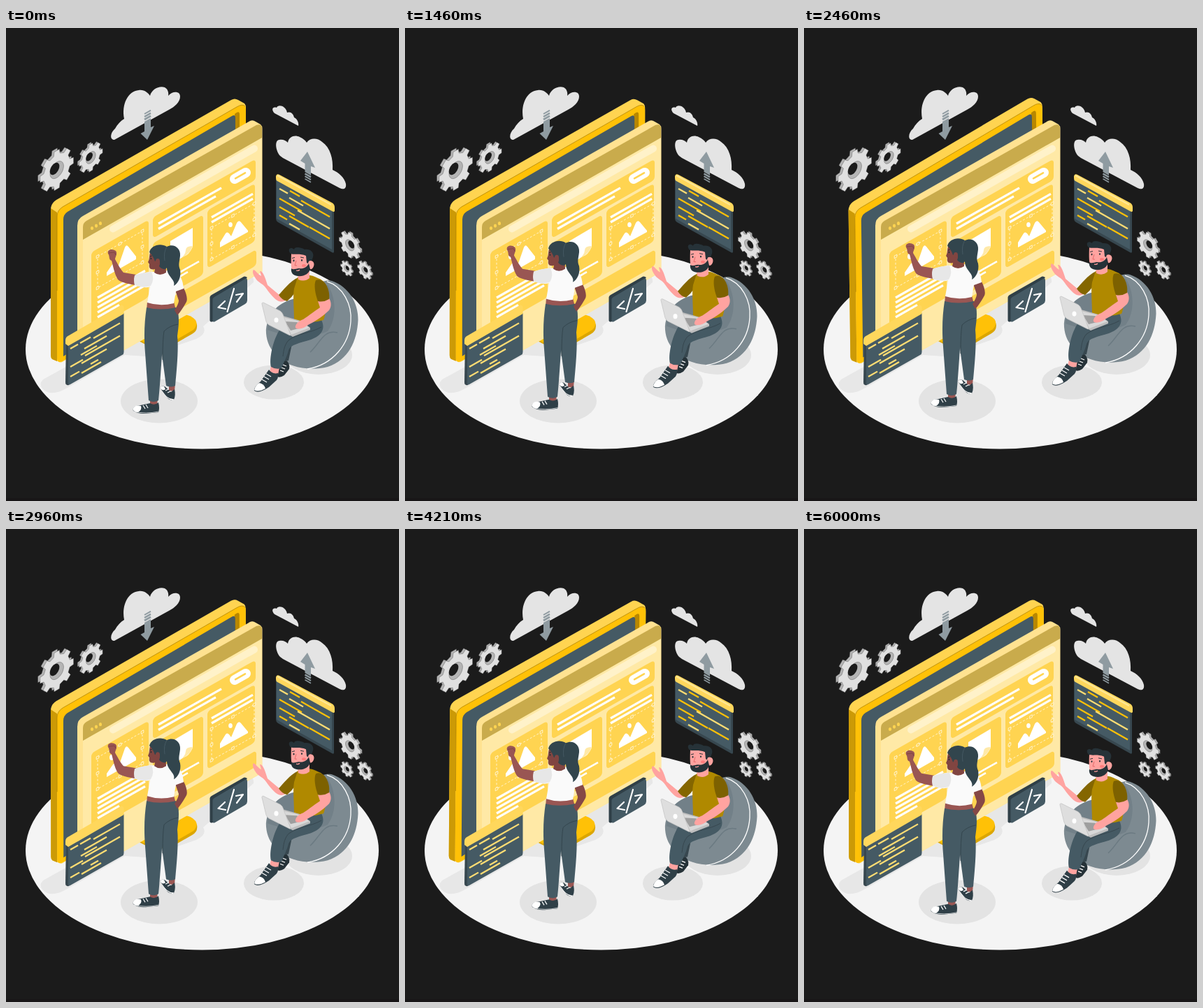
These frames come from a looping animation (562x677 px, 6040 ms). An HTML page:

```html
<!DOCTYPE html>
<html lang="en">
<head>
<meta charset="utf-8">
<title>Isometric web design scene</title>
<style>
html, body { margin: 0; width: 100%; height: 100%; overflow: hidden; background: #1b1b1b; }
svg { display: block; width: 100vw; height: 100vh; }
</style>
</head>
<body>
<svg id="stage" viewBox="0 0 562 677" preserveAspectRatio="none"></svg>
<script>
const LOOP = 6040, RISE = 11, SWAY = 1;
const BG = '#1b1b1b', SLATE = '#455a64', INK = '#263238', HAIR = '#32454d', GOLD = '#ffc107',
  YELLOW = '#ffd451', CREAM = '#ffe9a6', WHITE = '#fff', GREY = '#e0e0e0',
  BROWN = '#995653', PINK = '#ffa3a0';

const shape = (fill, d, extra = '') => `<path fill="${fill}" d="${d}" ${extra}/>`;
const stroke = (color, width, d, extra = '') =>
  `<path fill="none" stroke="${color}" stroke-width="${width}" d="${d}" ${extra}/>`;
const oval = (fill, cx, cy, rx, ry = rx) =>
  `<ellipse fill="${fill}" cx="${cx}" cy="${cy}" rx="${rx}" ry="${ry}"/>`;
const group = (id, body) => `<g id="${id}">${body}</g>`;
const ROUND = 'stroke-linecap="round" stroke-linejoin="round"';

// Line that follows the isometric slope: k < 0 climbs to the right.
const slant = (x, y, w, k = -0.569) => `M${x} ${y}l${w} ${w * k}`;

function gear(cx, cy, r, k, teeth = 8) {
  const point = (a, q) => {
    const x = Math.cos(a) * q, y = Math.sin(a) * q;
    return `${(x * 0.866).toFixed(2)} ${(y + x * k).toFixed(2)}`;
  };
  const ring = [];
  for (let i = 0; i < teeth; i++) {
    for (const [at, q] of [[-0.3, 0.79], [-0.2, 1], [0.2, 1], [0.3, 0.79]]) {
      ring.push(point((i + at) * 2 * Math.PI / teeth, r * q));
    }
  }
  const circle = q => 'M' + Array.from({ length: 32 }, (_, i) => point(i * Math.PI / 16, q)).join('L') + 'Z';
  const rim = `M${ring.join('L')}Z`, s = Math.sign(k), depth = r * 0.07;
  const place = (n, body) => `<g transform="translate(${cx + s * n} ${cy - n * 0.5})">${body}</g>`;
  const edge = 'stroke="#444" stroke-width=".4" stroke-linejoin="round"';
  return place(depth, shape('#b5b5b5', rim, edge)) +
    place(-depth * 0.6, shape(GREY, rim, edge) + shape('#b5b5b5', circle(r * 0.4), edge)) +
    place(depth, shape(BG, circle(r * 0.28)));
}

function floor() {
  return oval('#f4f4f4', 280.5, 460, 252.5, 142.5) +
    shape('#e7e7e7', 'M53 503L330 350Q356 350 354 364L282 427Q288 438 272 445L200 470L170 468L86 516Q64 528 53 517Q46 510 53 503Z') +
    oval('#e3e3e3', 219, 534, 55, 31.5) + oval('#e3e3e3', 383, 507, 43, 24.5) + oval('#e3e3e3', 447, 468, 48, 28);
}

function sky() {
  const arrow = '#8f9ba1';
  let s = shape('#e4e4e4', 'M155 160C148 160 149 150 156 144C159 138 164 133 169 130C165 110 174 90 190 89C198 88 203 93 206 97C208 88 219 82 227 85C231 87 233 92 232 97C238 90 249 90 249 98C249 106 241 113 233 117Z') +
    shape('#e4e4e4', 'M384 122C379 117 381 112 387 114C389 109 400 111 402 121C407 119 411 123 412 128C417 130 419 137 418 140Z') +
    shape('#e4e4e4', 'M392 183C385 175 384 160 391 160C396 159 400 161 403 164C405 154 414 153 420 156C425 158 428 161 430 164C435 157 445 157 452 163C464 171 468 188 467 203C476 207 484 214 486 223C487 230 483 232 477 229L396 186Z') +
    shape(arrow, 'M198 134L207 129V142L212 140L202 160L192.500 151L198 148Z') +
    shape(arrow, 'M431 177L442 200L436 198V211L427.500 206V194L421 190Z');
  for (let i = 0; i < 3; i++) {
    s += stroke(arrow, 2 + i * .4, slant(198, 123 + i * 4, 9)) +
      stroke(arrow, 2.4 - i * .4, slant(427.5, 208.5 + i * 3.7, 8.5, 0.569));
  }
  return s + gear(71.5, 202.5, 28, -0.5) + gear(120.5, 185, 19.7, -0.5) +
    gear(492.5, 310.5, 18, 0.5) + gear(487.5, 344, 10.2, 0.5) + gear(513.5, 346.5, 12.2, 0.5);
}

function monitor() {
  return shape('#dca600', 'M190 448L250 412Q275 416 273 428Q273 434 266 438L238 454Q213 462 190 448Z') +
    shape(GOLD, 'M190 446L250 410Q263 409 271 418Q275 425 268 432L237 450Q213 459 190 446Z') +
    shape(YELLOW, 'M64 260Q64 251 72 246L322 103Q327 100 332 103L341 108Q343 110 343 114V320L82 477Q78 480 74 477L66 474Q64 472 64 469Z') +
    shape('#cc9a06', 'M64 258L73 264V477L66 474Q64 472 64 469Z') +
    shape(GOLD, 'M73 270Q73 261 81 256L330 113Q343 106 343 117V320L84 475Q73 482 73 472Z') +
    stroke('#a87c00', .7, 'M73 376V270Q73 261 81 256L330 113Q338 108 342 112') +
    shape('#b88700', 'M327 123Q334 117 334 124V300H327Z') +
    shape(SLATE, 'M82 274Q82 267 88 263L323 126Q328 123 328 129V305L82 470Z');
}

function dashedBox(x, y, w, h) {
  const at = (u, v) => [x + w * u, y + h * v - w * u * 0.569];
  let s = stroke(WHITE, .7, 'M' + [at(0, 0), at(1, 0), at(1, 1), at(0, 1)].join('L') + 'Z', 'stroke-dasharray="3 2.5"');
  for (const u of [0, .5, 1]) for (const v of [0, .5, 1]) {
    if (u === .5 && v === .5) continue;
    const [a, b] = at(u, v);
    s += shape(YELLOW, `M${a - 1.8} ${b - .8}l3.600 -2v3.600l-3.600 2Z`, `stroke="${WHITE}" stroke-width=".7"`);
  }
  return s;
}

// Rounded panel sheared along the isometric slope; (x, y) is its upper left corner.
function card(x, y, w, h) {
  return `<rect transform="matrix(1 -.569 0 1 ${x} ${y})" width="${w}" height="${h}" rx="5" fill="${YELLOW}"/>`;
}

function browser() {
  let s = shape('#ffe291', 'M102 283Q102 273 110 269L349 133Q353 131 357 134L364 138Q366.500 140 366.500 144V349L102 499Z') +
    shape(CREAM, 'M110 300L366 155V349L110 495Z') +
    shape('#c9ab4c', 'M110 285Q110 279 115 276L358 139Q366 136 366 144V157L110 303Z');
  for (let i = 0; i < 3; i++) s += oval(YELLOW, 123 + i * 6, 286.5 - i * 3.4, 2.1, 2.6);
  s += stroke('#fff2c9', 10, slant(153, 287.5, 202), ROUND) +
    card(122, 321, 82, 111) + card(210, 271, 147, 30) + card(210, 308, 72, 86) +
    card(288, 261, 68, 83) + card(210, 401, 148, 23) +
    stroke(WHITE, 3.2, slant(218, 280, 90) + slant(218, 287.5, 82) + slant(294, 271, 59) + slant(294, 278, 59)) +
    stroke(WHITE, 14, slant(327, 216, 16), ROUND) + stroke(YELLOW, 2.5, slant(328, 215.3, 14), ROUND);
  for (let i = 0; i < 5; i++) s += stroke(WHITE, 3.2, slant(131, 386 + i * 7, i === 4 ? 31 : 68));
  return s + dashedBox(131, 327, 64, 45) + dashedBox(294, 286, 61, 45) +
    shape(WHITE, 'M144 355V350L153 337Q156 334 159 338L161 340L170 314Q172 309 175 313L186 327V331Z') +
    shape(WHITE, 'M306 314V307L314 294Q316 291 319 294L322 298L330 279Q333 274 336 278L346 290V292Z') +
    oval(WHITE, 321, 281.5, 2.8, 3.5) + oval(WHITE, 151, 327, 3, 4) +
    shape(WHITE, 'M235 305L267 286V313Q262 325 254 327Q246 333 235 338Z') +
    shape('#ffe9a8', 'M267 312Q257 312 257 318Q257 323 252 328Q263 324 267 312Z') +
    stroke(WHITE, 2.6, slant(248, 350, 28) + slant(248, 356, 12));
}

function codePanels() {
  const climbing = [[92, 459, 11], [106, 451, 15], [125, 444, 38], [112, 459, 32], [107, 468, 23], [92, 485, 18],
    [113, 469, 50], [108, 480, 36], [92, 499, 13], [108, 494, 28], [121, 481, 11]];
  const falling = [[391, 230, 12], [406, 233, 14], [422, 247, 41], [405, 243, 20], [391, 244, 32],
    [391, 256, 22], [417, 261, 46], [405, 269, 28], [391, 268, 11], [405, 280, 15], [434, 285, 29]];
  let s = shape('#37474f', 'M86 449L90 455V511Q85 512 85 507Z') +
    shape(SLATE, 'M89 455L168.500 408V464Q168.500 467 166 468L92 510Q89 512 89 509Z') +
    shape('#ffd75c', 'M85 447Q85 442 90 440L164 397Q168 396 168.500 400V409L89 455L85 452Z') +
    shape('#37474f', 'M386 216L469 262V320Q469 323 466 321L389 278Q386 276 386 273Z') +
    shape(SLATE, 'M387 217L466 262V317L389 274Q387 273 387 270Z') +
    shape('#ffd75c', 'M386 212Q387 208 391 210L466 250Q470 252 470 257V262Q469 264 466 262L388 219Q386 218 386 215Z') +
    stroke('#ffe796', 2, 'M388 211L465 253');
  climbing.forEach(l => s += stroke('#ffdd73', 2.2, slant(...l)));
  falling.forEach((l, i) => s += stroke(i % 3 ? GOLD : '#ffdd73', 2.2, slant(...l, .569)));
  return s + shape('#2f3f47', 'M291.500 387Q291 384 294 382L338 357Q341 354 345 357L296 420Q291 422 291.500 417Z') +
    shape(SLATE, 'M295.500 390Q295 387 298 385L342 359Q345 357 345 361V390Q345 393 342 395L299 420Q295.500 422 295.500 418Z') +
    stroke(WHITE, 2.2, 'M313 391L303.500 400L314 402M326 373L316.500 406M329 382L339 380L330 392', ROUND);
}

function laces(points) {
  return points.map(([x, y, dx, dy]) => stroke(WHITE, 1.2, `M${x} ${y}l${dx} ${dy}`)).join('');
}

function man() {
  return shape('#7d8a91', 'M372 437C370 410 395 388 430 386C437 370 452 359 466 362C490 370 504 394 503.500 418C502 448 490 475 460 485C435 491 405 487 388 470C378 460 373 450 372 437Z') +
    shape('#728088', 'M374 420C382 396 408 384 432 386C440 374 450 367 460 368C472 385 474 415 460 434C440 444 400 442 374 432Z') +
    stroke('#6b7a82', 1.5, 'M474 436C454 431 450 450 435 464') +
    stroke(WHITE, 1.3, 'M459 363C482 370 495 396 493 420C491 452 468 482 431 488') +
    // back shoe, legs, front shoe
    shape(INK, 'M398 474Q407 479 405 488L398 497Q389 503 386 496L393 480Z') +
    laces([[396, 482, 5, 2], [394, 486, 5, 2], [392, 490, 5, 2]]) +
    shape('#37474f', 'M396 452L409 452L404 476L394 478Z') +
    shape(PINK, 'M379 484L391 486L389 496L377 492Z') +
    shape(SLATE, 'M407 420L450 416C458 430 452 440 436 446C420 451 407 453 404 461C402 471 396 480 394 487Q385 489 379 485C376 473 382 450 387 440C391 430 398 424 407 420Z') +
    stroke('#37474f', 1, 'M451 428C435 437 417 437 404 447C397 455 397 464 396 470') +
    shape('#2f3f47', 'M376 489Q381 496 389 494Q390 500 387 504L376 514Q361 524 355 519Q354 514 364 506Z') +
    shape(WHITE, 'M355 518Q356 512 362 508Q369 509 371 516Q360 522 355 518Z') +
    laces([[366, 503, 7, 4], [369, 499, 7, 4], [372, 495, 7, 4]]) +
    // far arm and torso
    shape(PINK, 'M392 383L374 368L371 359C369 353 366 347 363 348L365 355C361 353 357 347 354 346C351 349 355 356 358 360C362 365 367 366 370 370C376 378 384 389 390 391Q396 393 401 389Z') +
    shape('#846600', 'M418 357C406 362 396 376 390 382Q394 389 402 391Q409 385 413 379Z') +
    shape('#b08900', 'M417 357Q432 350 446 358C458 362 462 374 460 388L457 392C458 402 456 414 454 418Q432 425 412 417C412 400 410 385 412 373Z') +
    // head
    shape(PINK, 'M408 322L431 322L432 334C438 331 442 336 440 341C438 346 435 346 434 344L434 358Q427 364 418 360L417 354C408 354 407 345 408 322Z') +
    shape(INK, 'M408 344C411 347 415 344 419 344C425 345 430 343 433 337L435 345C433 352 426 356 417 355C410 354 407 350 408 344Z') +
    shape(INK, 'M407 323C402 318 406 312 412 317C412 312 423 314 427 317C435 316 441 321 439 328L437 333Q433 331 432 337L430 336L429 326C420 322 413 325 407 323Z') +
    oval('#ff7d7d', 426, 340, 3, 2) + oval(INK, 411.5, 333, 1, 1.4) + oval(INK, 423, 332.5, 1, 1.4) +
    stroke(INK, 1, 'M409 329.500L413 328.500M421 328L426 329') +
    stroke('#e56b6b', 1, 'M415 333L413 340L416 340') + stroke('#ff9c9c', 1.3, 'M415 347Q418 348 420 346') +
    // laptop and near arm
    shape('#bdbdbd', 'M396 412L421 419L435 429V432L410 442L403 438Z') +
    shape('#d8d8d8', 'M396 414L420 420L434 429L408 439Z') +
    shape('#9e9e9e', 'M399 420L416 421L427 428L407 433Z') +
    shape(PINK, 'M446 391L462 387C466 393 465 400 462 404C452 414 440 421 432 425C425 431 416 432 414 429C413 425 418 419 425 417C434 411 443 404 449 400Z') +
    shape('#7d6100', 'M443 361C455 356 464 374 462 388Q454 393 446 391C442 380 440 368 443 361Z') +
    shape('#dedede', 'M366 395Q366 392 369 393.500L392 405Q395 407 396 410L407 439Q407 441 404 439L376 425Q373 423 372 420Z', 'stroke="#c6c6c6" stroke-width=".8"') +
    oval(WHITE, 386.5, 418, 3, 3.6);
}

function woman() {
  return shape(BROWN, 'M233 508H242L241 520L233 519ZM206 528H217L216 542L206 541Z') +
    // far shoe and far leg
    shape('#2f3f47', 'M221 516Q221 511 227 513L236 521L241 517Q243 526 240 532Q233 534 229 527Z') +
    shape(WHITE, 'M221 516Q221 511 226 513L228 517Q224 520 221 516ZM222 518Q231 532 240 531L239 533Q230 532 222 518Z') +
    laces([[228, 519, 4, -2], [231, 522, 4, -2]]) +
    shape(SLATE, 'M216 402H245C249 418 246 432 245 441C247 460 244 490 242 512Q236 515 229 512L224 475Z') +
    // near shoe and near leg
    shape('#2f3f47', 'M206 537Q212 541 218 536Q220 544 218 550L200 552Q184 552 181 546Q183 540 192 540Z') +
    shape(WHITE, 'M181 546Q184 538 193 541Q195 546 189 550Q184 550 181 546Z') +
    laces([[196, 540, 3, 5], [200, 539, 3, 5]]) +
    stroke(WHITE, .7, 'M183 549Q200 553 218 549') +
    shape(BROWN, 'M202 392H240L243 404H201Z') +
    shape(SLATE, 'M201 400Q220 405 243 400Q247 412 246 424Q235 432 226 434C223 460 221 505 218 533Q211 537 204 533L199 465C197 440 198 420 201 400Z') +
    stroke('#34464e', 1, 'M246 424Q234 426 226 434Q224 445 224 475') +
    // arms
    shape('#854846', 'M242 375L254 372C258 380 260 388 258 392C254 399 250 406 245 411L241 404C244 399 247 394 247 390Z') +
    shape(BROWN, 'M146 323C144 317 152 315 157 319C160 323 156 328 156 331C160 338 164 346 168 350L186 353L185 368C174 366 164 364 160 360C155 352 153 340 151 333C146 331 149 327 146 323Z') +
    stroke('#7b403f', .8, 'M147 322L155 321L157 325') +
    // top
    shape('#fafafa', 'M211 349C201 349 192 351 184 354L186 368C194 372 202 372 206 370L202 393Q220 399 240 394L243 377L254 373C253 362 250 352 242 350Q226 344 211 349Z') +
    shape('#e7e7e7', 'M208 349Q194 350 184 354Q182 361 184 368Q196 373 207 369Q213 359 208 349Z') +
    // head
    shape('#814541', 'M207 319C204 326 206 330 203 335L205 338C204 343 206 347 213 345L212 350Q220 356 229 350L228 322Z') +
    shape(HAIR, 'M205 321C207 311 221 307 230 313C240 308 250 315 249 326C248 335 246 339 249 346C251 356 246 366 240 369C243 360 230 356 230 343C228 347 222 345 219 341Q222 334 217 331L213 334Q210 325 205 321Z') +
    oval('#814541', 217, 334, 3, 4) +
    stroke('#4a5e67', .8, 'M230 313Q225 321 227 333') + stroke(INK, 1, 'M206 327L209 326') +
    oval(INK, 207.5, 330, .8, 1.3);
}

document.getElementById('stage').innerHTML =
  `<rect width="562" height="677" fill="${BG}"/><rect y="673" width="562" height="4" fill="#181617"/>` +
  floor() + sky() + group('monitor', monitor()) + browser() + codePanels() +
  group('man', man()) + group('woman', woman());

const parts = Object.fromEntries(['monitor', 'man', 'woman'].map(id => [id, document.getElementById(id)]));
const triangle = p => 1 - Math.abs(2 * p - 1);

function draw(ms) {
  const p = (ms % LOOP) / LOOP;
  const lift = -RISE * triangle(p);
  // two sways per loop: 0, +1, 0, -1, 0 with straight ramps
  const angle = SWAY * (2 * triangle((2 * p + 0.25) % 1) - 1);
  parts.monitor.setAttribute('transform', `rotate(${angle} 203 290)`);
  for (const body of [parts.man, parts.woman]) body.setAttribute('transform', `translate(0 ${lift})`);
}

const start = performance.now();
function tick() {
  draw(performance.now() - start);
  requestAnimationFrame(tick);
}
tick();
</script>
</body>
</html>
```
